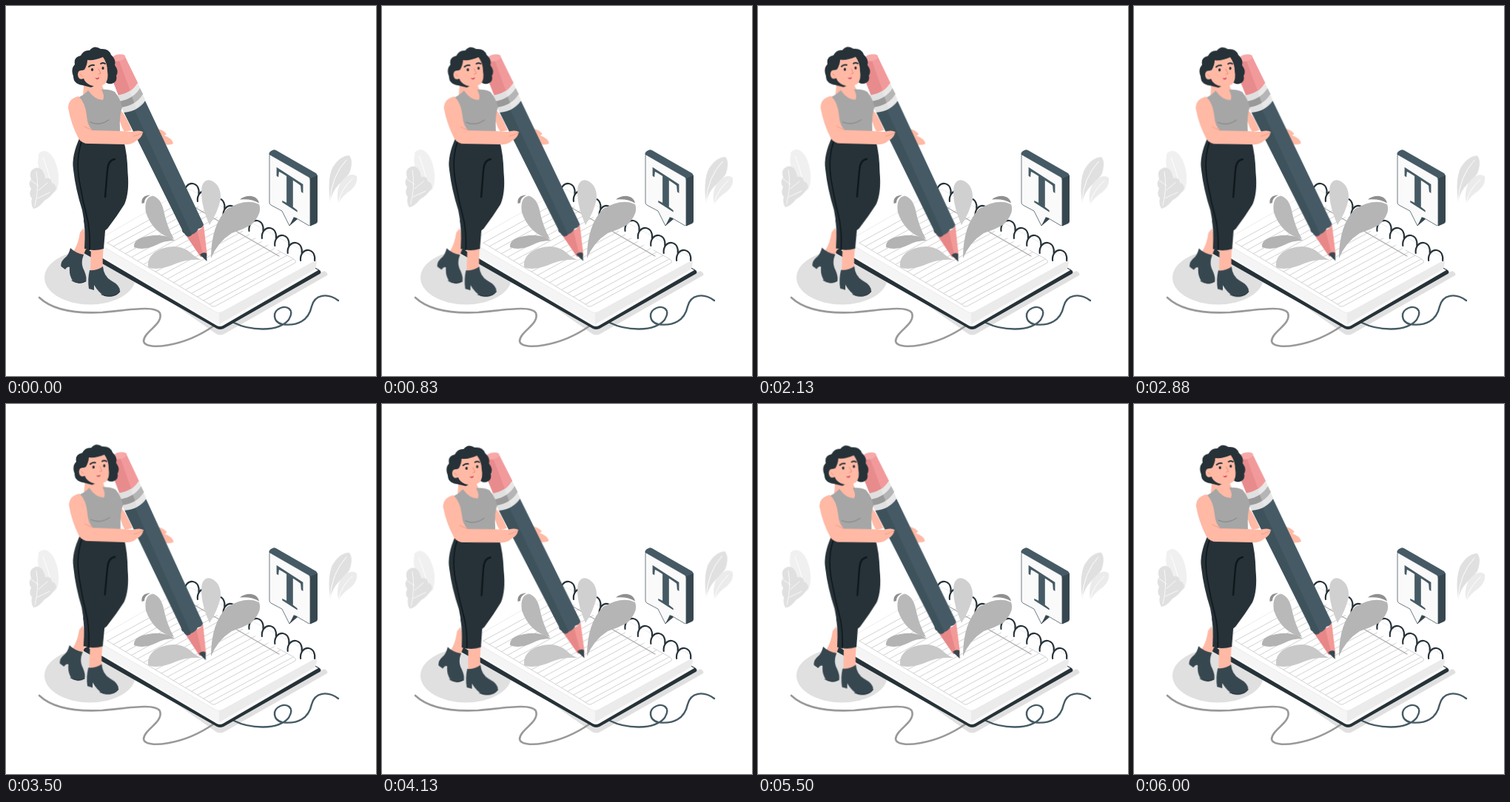
Animation of 500x500 px, one loop 6.04 s. Source, as an HTML page:

```html
<!DOCTYPE html>
<html lang="en">
<head>
<meta charset="utf-8">
<title>Writing with a giant pencil</title>
<style>
html, body { margin: 0; width: 100%; height: 100%; overflow: hidden; background: #fff; }
svg { display: block; width: 100vw; height: 100vh; }
.line { fill: none; stroke-linecap: round; stroke-linejoin: round; }
#leaves { transform-origin: 252px 236px; }
#writer { transform-origin: 172px 225px; }
</style>
</head>
<body>
<svg viewBox="0 0 500 500">
  <g id="leaves">
    <path fill="#f0f0f0" d="M44 200Q49 194 56 197Q66 203 70 222Q73 238 68 250L56 256Q46 236 43 212Z"/>
    <path class="line" stroke="#fff" d="M50 205Q58 225 64 252"/>
    <path fill="#e0e0e0" d="M36 221Q42 216 48 221Q52 226 53 233Q61 231 62 239Q67 240 68 247Q61 258 52 263Q43 274 37 274Q33 268 35 260Q30 255 34 247Q29 240 34 234Q31 225 36 221Z"/>
    <path class="line" stroke="#fff" stroke-width=".8" d="M41 224Q45 246 39 270M34 236L44 243M44 249L56 239M42 260L59 252"/>
    <path fill="#e0e0e0" d="M438 264Q434 235 441 219Q451 202 464 202Q470 210 464 226Q458 234 450 241Q441 250 438 264Z"/>
    <path fill="#ebebeb" d="M449 266Q445 246 456 234Q466 224 474 230Q476 240 466 249Q455 256 449 266Z"/>
    <path class="line" stroke="#fff" d="M438 262Q440 230 460 208M449 265Q453 247 468 234"/>
  </g>

  <ellipse cx="113.500" cy="367" rx="61.500" ry="36.500" fill="#e0e0e0"/>
  <path fill="#e0e0e0" d="M214 394L284 443Q289 446 295 443L434 364Q436 361 430 358L289 430Z"/>

  <g class="line">
    <path stroke="#999" stroke-width="2.600" d="M45 394C62 410 92 416 130 414C165 411 202 404 208 415C213 430 186 440 186 453C188 466 240 461 281 432"/>
    <path stroke="#455a64" stroke-width="2.400" d="M308 428C330 439 368 441 382 424C391 409 379 405 371 408C359 413 361 427 373 430C394 433 409 425 413 406C417 390 434 387 449 398"/>
  </g>

  <g id="book">
    <path fill="#263238" d="M106 330Q103 333 107 335L285 436Q289 438 294 436L424 362Q427 360 424 357L250 257Z"/>
    <path fill="#fafafa" d="M112 330L285 432Q289 434 293 432L422 357L250 258Z"/>
    <path fill="#f5f5f5" d="M121 318V332L283 428Q288 430 288 430V414Z"/>
    <path fill="#ebebeb" d="M288 414V430L417 356Q420 354 420 342Z"/>
    <path fill="#fff" stroke="#e6e6e6" stroke-width=".7" d="M124 316L241 249Q246 246 251 249L417 339Q421 342 417 345L293 413Q288 416 283 413L124 321Q119 318 124 316Z"/>
    <g id="rules" class="line" stroke="#d3d3d3" stroke-width="1"></g>
    <path class="line" stroke="#d3d3d3" d="M137 320L275 403Q278 407 282 406L391 347Q393 345 389 342L367 330"/>
    <path class="line" stroke="#aaa" stroke-width="1.200" d="M250 269L369 338"/>
    <g id="rings" class="line" stroke="#263238" stroke-width="2.100"></g>
  </g>

  <g id="bubble">
    <path fill="#455a64" d="M355.500 201Q355 198 358 196L361 194.500Q363 194 365 195L419 226Q421 228 421 230L411 235Z"/>
    <path fill="#37474f" d="M411 233L421 229V291Q421 293 419 294L411 297.500Z"/>
    <path fill="#37474f" d="M383 297L394 287L390 282Z"/>
    <path fill="#fafafa" stroke="#455a64" stroke-width=".8" stroke-linejoin="round" d="M356 203Q356 200 358.500 202L409 231Q411 232 411 235V295Q411 298 408 296L391 286L383 297L373 277L358 269Q356 268 356 265Z"/>
    <path fill="#37474f" d="M383 297L394 288L389 285Z"/>
    <text transform="matrix(.866 .56 0 1 383.500 272)" font-family="'Liberation Serif', Times, serif" font-weight="700" font-size="65" text-anchor="middle" fill="#455a64">T</text>
  </g>

  <g id="splash">
    <path fill="#8f8f8f" d="M183.500 267Q182 256 195 255.500Q187 259 187 266Z"/>
    <path fill="#b9b9b9" d="M227 315Q199 308 189 279Q186 259 198 256.500Q209 259 213 276Q217 297 227 315Z"/>
    <path fill="#b3b3b3" d="M173 326Q172 314 192 311Q215 307 228 317Q213 317 203 323Q186 331 173 326Z"/>
    <path fill="#c9c9c9" d="M192 353Q190 336 210 328Q233 320 249 333Q256 340 264 343Q244 341 225 350Q204 358 192 353Z"/>
    <path fill="#d0d0d0" d="M275 296Q262 266 264.500 245Q267 234 276 235.500Q291 241 290 261Q286 279 275 296Z"/>
    <path fill="#8f8f8f" d="M316 261.500Q323 256 332 257Q341 259 342 266.500Q332 260 316 261.500Z"/>
    <path fill="#b5b5b5" d="M277 341Q277 296 299 274Q325 259 342 268Q347 280 331 296Q318 303 305 307Q286 319 277 341Z"/>
  </g>

  <g id="writer">
    <path fill="#ffb9a5" d="M199 164Q213 167 217 173L214 175Q225 179 226 186Q219 189 209 186L202 182ZM152 138Q160 144 170 168L160 170Q152 158 152 138Z"/>

    <g id="pencil">
      <path fill="#f39a98" d="M238 302Q252 308 258 303Q265 302 267 295L272 338L263 339Z"/>
      <path fill="#e88788" d="M238 302L258 302L267 339L263 339Z"/>
      <path fill="#455a64" d="M159 143Q181 140 188 128L267 295Q266 300 260 301Q257 307 251 309Q246 315 241 307Q238 306 238 302Z"/>
      <path fill="#3e525c" d="M159 143Q167 142 173 139L251 309Q246 315 241 307Q238 306 238 302Z"/>
      <path fill="#e88b8c" d="M139 73Q150 62 161 69L178 104Q169 118 152 121L139 88Z"/>
      <path fill="#f29a9b" d="M153 74L161 69L178 104Q174 111 168 115Z"/>
      <ellipse cx="152" cy="70" rx="9.500" ry="4.500" fill="#f7a8a8" transform="rotate(-12 152 70)"/>
      <path fill="#e0e0e0" d="M149 121Q170 118 178 104L188 127Q180 142 159 144Z"/>
      <path fill="#999" d="M153 129Q173 125 181 111L185 119Q176 134 156 137Z"/>
      <path fill="#fff" opacity=".28" d="M168 117L178 104L188 127L176 138Z"/>
      <path fill="#37474f" d="M262 336Q266 332 271 334L271.500 345Z"/>
    </g>

    <!-- legs -->
    <path fill="#ffb9a5" d="M105 300L109 326L104 338L91 332Q98 321 100 306Z"/>
    <path fill="#37474f" d="M87 327Q94 334 105 336Q101 346 104 354Q110 366 108 372Q100 378 90 371Q85 364 86 353Q83 351 80 356L74.500 352Q73 346 80 340Q85 336 87 327Z"/>
    <path class="line" stroke="#263238" d="M89 371Q98 377 108 372"/>
    <path fill="#ffb9a5" d="M115 325H132Q130 341 131 355Q124 361 114 358Z"/>
    <path fill="#37474f" d="M113 357Q123 358 131 352Q132 365 142 371Q155 378 154 386Q148 395 133 392Q125 387 119 377V384L112 382Q110 369 113 357Z"/>
    <path class="line" stroke="#263238" d="M129 390Q145 396 154 386"/>
    <path fill="#263238" d="M140 180L159 182Q164 200 164.500 225Q167 252 160 268Q150 284 137 301L122 312L109 306L105 290Z"/>
    <path fill="#263238" d="M100 177L158 181Q162 196 158 203Q146 204 142 216Q138 246 136 280L132 328Q119 332 106 328Q108 300 103 276Q94 248 91 221Q88 203 100 177Z"/>
    <path class="line" stroke="#0f171b" stroke-width="1.600" d="M103 181Q94 204 99 236Q104 265 111 292Q114 312 113 329"/>
    <path class="line" stroke="#0f171b" stroke-width="2.400" d="M147 207Q138 208 137 222L134 258"/>

    <!-- torso -->
    <path fill="#ffb9a5" d="M106 98L130 104Q129 112 137 117L130 130L114 126L104 120Z"/>
    <path fill="#a6a6a6" d="M99 123Q107 119 111 114Q120 127 131 127Q134 122 129 113Q139 112 147 116Q155 126 157 137Q153 146 154 168V184H103Z"/>
    <path class="line" stroke="#828282" d="M114 157Q126 163 139 154"/>
    <path fill="#ffb9a5" d="M98 122Q84 125 84 138Q88 160 98 179Q103 187 114 186L160 187Q170 188 176 182Q184 178 185 170Q180 167 170 170L154 169L117 168Q110 162 109 148Q107 130 98 122Z"/>
    <path class="line" stroke="#ed977f" stroke-width=".8" d="M117 168L106 163M185 171Q178 175 172 176"/>

    <!-- head -->
    <path fill="#263238" d="M103 107Q91 105 91 95Q87 85 93 79Q91 69 101 67Q105 59 113 60Q119 52 128 58Q139 57 142 66Q149 72 147 80Q153 88 149 94Q151 103 143 105Q136 106 133 101L115 110Z"/>
    <path fill="#ffb9a5" d="M106 86Q110 79 110 73Q120 74 131 69Q137 77 137 88Q139 99 134 105Q126 111 114 107Q107 104 105 98Q98 101 97 93Q97 86 103 87Z"/>
    <path class="line" stroke="#263238" stroke-width="1.900" d="M112 82Q115 79 119 80M128 78Q131 76 134 78"/>
    <ellipse cx="116.500" cy="86" rx="1.700" ry="2.100" fill="#263238"/>
    <ellipse cx="131" cy="84" rx="1.600" ry="2.100" fill="#263238"/>
    <path class="line" stroke="#ed8d76" d="M125 85L128 91L125 92M100 92L103 95"/>
    <path fill="#d9546a" d="M120 97Q123 98 126 96Q126 100 122 99Z"/>
  </g>
</svg>
<script>
const LOOP = 6040;
const $ = id => document.getElementById(id);
const mix = (a, b, k) => a + (b - a) * k;

function addPath(parent, d) {
  const path = document.createElementNS("http://www.w3.org/2000/svg", "path");
  path.setAttribute("d", d);
  parent.append(path);
}

const ROWS = 18;
for (let i = 0; i < ROWS; i++) {
  const k = i / (ROWS - 1);
  addPath($("rules"), `M${mix(137, 275, k)} ${mix(320, 403, k)}L${mix(243, 388, k)} ${mix(262, 342, k)}`);
}

for (let i = 0; i < 10; i++) {
  const x = 250.5 + 17.4 * i, y = 248 + 10 * i;
  addPath($("rings"), `M${x - 9} ${y + 6}c-1 -9 5 -15 11 -14c6 1 9 7 8 14`);
}

// Rock one degree to each side of rest.
function sway(id, duration) {
  $(id).animate([
    { offset: 0, transform: "rotate(0deg)" },
    { offset: .25, transform: "rotate(1deg)" },
    { offset: .75, transform: "rotate(-1deg)" },
    { offset: 1, transform: "rotate(0deg)" }
  ], { duration, iterations: Infinity });
}

sway("writer", LOOP / 4);
sway("leaves", LOOP);
</script>
</body>
</html>
```
